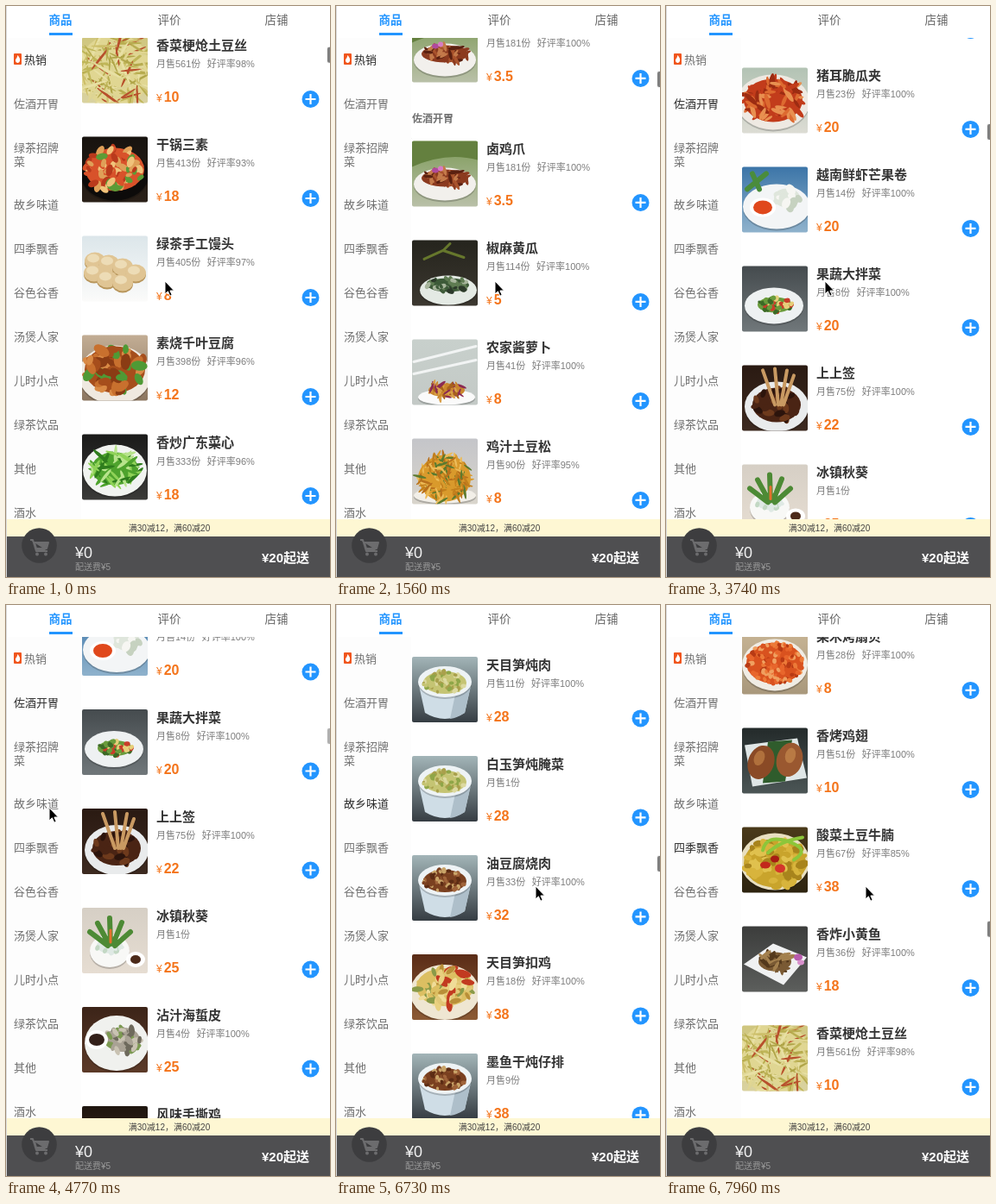
An HTML page that plays this animation: 375 by 662 pixels, repeating every 8 s.

```html
<!DOCTYPE html>
<html lang="zh-CN">
<head>
<meta charset="utf-8">
<style>
html, body { margin: 0; width: 100%; height: 100%; overflow: hidden; background: #fff; }
body { position: relative; font-family: "Liberation Sans", "Noto Sans CJK SC", "Noto Sans CJK", sans-serif; }
body div, body svg { position: absolute; white-space: nowrap; }
#view { left: 0; top: 37px; width: 375px; height: 558px; overflow: hidden; }
#list { left: 88px; top: 0; width: 287px; }
#list > div { left: 0; width: 287px; }
.item svg { left: 0; top: 0; border-radius: 2px; }
.name { left: 86px; top: -.5px; font: bold 15px/20px "Liberation Sans", "Noto Sans CJK SC", sans-serif; color: #333; }
.sold { left: 86px; top: 21px; font-size: 11px; line-height: 20px; color: #7c7c7c; }
.sold span { margin-left: 7.5px; }
.price { left: 86px; top: 60px; font-size: 12px; line-height: 20px; color: #f4741a; }
.price b { font-size: 16px; margin-left: 2px; }
.item .add { left: 254px; top: 61px; border-radius: 0; }
.head { font-size: 12px; line-height: 27px; font-weight: bold; color: #707070; }
#menu { left: 0; top: 0; width: 87px; height: 558px; background: #fdfdfd; }
#menu div { left: 9px; width: 53px; font-size: 13px; line-height: 16px; color: #707070; white-space: normal; }
#menu .on { color: #2c2c2c; }
#edge { left: 0; top: 0; width: 1px; height: 662px; background: #d8d8d8; }
#thumb { left: 371px; width: 5px; height: 18px; border: 1px solid rgba(255,255,255,.9); border-radius: 3px; background: #7f7f7f; }
.tab { top: 7px; width: 60px; text-align: center; font-size: 13.5px; line-height: 20px; color: #666; }
#tip { left: 0; top: 595px; width: 375px; height: 20px; background: #fef7d3; }
#tip div { left: 0; width: 378px; text-align: center; font-size: 10px; line-height: 21px; color: #444; }
#bar { left: 0; top: 615px; width: 375px; height: 47px; background: #4f4f51; }
</style>
</head>
<body>
<div id="view">
  <div id="list"></div>
  <div id="menu"></div>
  <div id="thumb"></div>
</div>
<div class="tab" style="left:33px;color:#2395ff;font-weight:bold">商品</div>
<div class="tab" style="left:159px">评价</div>
<div class="tab" style="left:283px">店铺</div>
<div style="left:50px;top:31px;width:27px;height:3px;background:#2395ff"></div>
<div id="tip"><div>满30减12，满60减20</div></div>
<div id="bar">
  <svg style="left:18px;top:-10px" width="41" height="41">
    <circle cx="20.5" cy="20.5" r="20.3" fill="#3d3d3f"/>
    <path d="M10 14h3l4 13h13M15 17h16l-2 7H17z" fill="#6c6c6e" stroke="#6c6c6e" stroke-width="2" stroke-linejoin="round"/>
    <circle cx="18" cy="30.500" r="2" fill="#6c6c6e"/><circle cx="28" cy="30.500" r="2" fill="#6c6c6e"/>
  </svg>
  <div style="left:80px;top:8px;font-size:18px;line-height:22px;color:#f2f2f2">¥0</div>
  <div style="left:80px;top:27px;font-size:10px;line-height:18px;color:#999">配送费¥5</div>
  <div style="left:296px;top:14px;font-size:15px;line-height:22px;font-weight:bold;color:#fff">¥20起送</div>
</div>
<div id="edge"></div>
<svg id="mouse" width="14" height="21" style="left:0;top:0">
  <path d="M1 1V16L4.4 12.8 6.8 18.2 9.2 17.2 6.9 12H11.5Z" fill="#000" stroke="#fff"/>
</svg>
<script>
const $ = id => document.getElementById(id);
const LOOP = 8000, STEP = 115, HEAD = 29;

const menu = ['热销', '佐酒开胃', '绿茶招牌菜', '故乡味道', '四季飘香', '谷色谷香', '汤煲人家', '儿时小点', '绿茶饮品', '其他', '酒水'];
const starts = [0, 10, 37, 62, 75];   // first dish of each category
const catTop = c => starts[c] * STEP + c * HEAD;

// top and bottom colour ; plate: cx cy rx ry colour ; food: cx cy rx ry count length width colours
const pot = '#a3b5b8 #363d43;38 29 31 18 #eef3f5;38 30 25 13 50 4 3 ';
const looks = {
  shreds: '#cfc67f #d9d2a0;;38 38 42 42 160 18 1.6 #e0d692 #bfb658 #dcd494 #b0a548 #e8e0a4 #cdbf6a #b8ad50 #e0d898 #b8502c',
  wok: '#17130f #2a2018;38 44 39 30 #0d0b0a;38 38 34 25 75 7 4 #d8522a #5c9c36 #dfa058 #f0c27a #b93a1c',
  buns: '#dce6ea #fbfbfa;;',
  tofu: '#c2ad94 #8c7660;38 46 42 34 #efe9e0;38 40 35 27 55 10 6 #a64e1c #c8702e #8a3c14 #d98a45 #4f9a35',
  greens: '#1b1b1a #3a3a38;38 42 37 30 #f1f3f0;38 40 27 19 55 13 2.4 #4ea32d #8fd257 #2f7d1d #b8e38c',
  feet: '#7d9a58 #b9c0a8;38 50 36 19 #f2f0ec;38 43 27 10 44 8 2.5 #8b3a1f #a9532c #5a2010 #c47a4a',
  cucumber: '#25241d #3c3830;42 58 33 17 #e4eae4;42 52 24 8 36 5 3 #3d5a38 #5f7c52 #2c3a2a #a7b59c',
  radish: '#c8d0cc #c3c9c6;40 67 33 9 #fafafa;40 59 21 8 38 9 2 #c9872e #d9a04a #a8621c #8b2a54',
  pile: '#c4c5c9 #d9d5cc;38 66 36 9 #f2efe8;38 46 30 27 120 9 1.6 #d99a2c #c27f1c #ecbb58 #5c7a2e #b8701c',
  fungus: '#416a9a #c5d3df;38 42 37 30 #eef1f0;38 36 27 17 55 6 4 #23261f #373a2e #15170f #739a3a',
  sesame: '#aebfa0 #cfd0cc;40 60 37 14 #fafafa;40 50 16 9 45 6 2.5 #8c6a42 #a98552 #6b8a3e #6a4a2c',
  cream: '#33414c #55636c;;38 51 20 7 22 6 3 #7a4020 #a0612e',
  mortar: '#39423f #1f2524;;40 26 17 7 26 5 3 #7a4526 #a86c3c #46210f',
  salad: '#1b2226 #3a4448;38 44 34 24 #edf1ea;36 36 19 13 45 6 3 #7fae50 #b7d18c #e6e8c4 #c23426',
  ears: '#b3c3b4 #dcdcd4;36 40 42 32 #eee9e2;36 38 34 25 70 10 3 #c23c1b #dd6a30 #9c2c12 #e89050',
  rolls: '#3c75a8 #8fb2cc;40 46 39 26 #f3f5f6;52 36 15 11 14 7 5 #dfe6dc #f6f6f2 #c6d2c0',
  boat: '#454b4e #70777a;37 46 34 21 #eef1f2;38 45 20 9 45 4 3 #6a9c3c #c93e2a #e6cf7a #3c6a26',
  sticks: '#2a1a12 #3d2a20;40 48 37 29 #e9ebec;40 46 28 20 30 7 4 #4a2414 #6e3a1c #2c140c',
  okra: '#d6cfc5 #e6ddd2;32 50 23 19 #f8f8f6;32 44 15 9 24 4 3 #dfe9e4 #c3d8c4',
  jelly: '#3c2418 #5c3a28;40 42 37 32 #f0f1ee;48 38 19 14 38 8 4 #a9a294 #c9c2b2 #6e6a5c #7c9a52',
  chicken: '#1f1610 #3a281c;38 50 36 24 #4a3020;38 44 26 16 45 8 3 #c98a4a #e0b47a #8c4f24 #5c8c36',
  potA: pot + '#c5c473 #8fa648 #dcd9a0 #a9a04c',
  potB: pot + '#7a4020 #5c2c14 #a0643a #c9a468',
  braise: '#5a2c17 #8c5a34;38 44 40 32 #efe6d2;38 38 33 22 60 9 4 #dcbf62 #f0dc98 #b98f38 #e2c878 #e9d080 #8a9a48 #c23a20',
  scallop: '#c8b595 #a9987c;38 42 38 30 #f0ece4;38 40 33 24 110 4 3 #d9521f #ec7a38 #b83a14 #f0a060 #e8662c',
  wings: '#232a2a #4c5656;;',
  sour: '#4a3a1a #2e2410;38 40 40 33 #e8dfc0;38 42 36 28 75 8 5 #c9a42c #e0c14e #a8841c #d8b43c',
  fish: '#3c3d3c #5c5e5c;;38 41 19 11 32 10 3 #7a5a34 #a3804e #54391c'
};

const dot = (x, y, rx, ry, fill, turn = 0) =>
  `<ellipse cx="${x}" cy="${y}" rx="${rx}" ry="${ry}" fill="${fill}" transform="rotate(${turn} ${x} ${y})"/>`;
const line = (d, color, w) => `<path d="${d}" stroke="${color}" stroke-width="${w}" fill="none" stroke-linecap="round"/>`;
const fill = (d, color) => `<path d="${d}" fill="${color}"/>`;
const bun = (x, y) => dot(x, y + 2, 12, 10, '#b8965c') + dot(x, y, 12, 10, '#e0c594') + dot(x - 2, y - 3, 7, 5, '#eddcb6');

// shapes below the food
const body = fill('M7 29L15 65Q38 79 61 65L69 29Z', '#cfdde6') + fill('M50 44L69 29 61 65Q52 71 44 72Z', '#aebfca');
const unders = {
  potA: body, potB: body,
  feet: fill('M0 0H76V22Q40 12 0 30Z', '#64803f'),
  cream: fill('M4 38L40 20 74 42 34 68Z', '#f1f3f5'),
  wings: fill('M3 20L64 12 75 58 12 68Z', '#dfe6e6'),
  fish: fill('M2 44L36 20 75 36 48 68Z', '#f0f1f2')
};
// shapes above the food
const extras = {
  buns: bun(15, 29) + bun(31, 32) + bun(47, 36) + bun(14, 43) + bun(62, 43) + bun(29, 50) + bun(47, 54),
  feet: dot(27, 34, 4, 3, '#b04a9c') + dot(33, 32, 3, 3, '#d67cc4'),
  cucumber: line('M14 22L36 12 60 20M36 12L44 4', '#66772c', 3),
  radish: line('M2 26L74 8M2 40L74 24', '#f2f4f4', 3),
  cream: fill('M20 32L46 27 58 35 56 49 31 53 20 45Z', '#f8f4e6') + line('M21 40L32 46 57 41', '#7a5a3c', 4),
  mortar: fill('M17 27Q40 42 64 27L58 66Q40 76 24 66Z', '#55301f') + line('M42 27L24 9', '#b5763c', 7),
  rolls: dot(24, 47, 15, 11, '#fff') + dot(24, 47, 11, 8, '#e0481c') + line('M6 26L28 8M12 8L20 26', '#4a8c3c', 6),
  sticks: line('M38 46L24 6M42 46L38 4M45 46L52 6M48 46L60 12', '#c99a62', 4),
  okra: line('M30 44L9 28M31 42L18 18M33 42L32 12M36 42L46 17M38 44L56 28', '#4d8a35', 6) + line('M33 40V26', '#e2702c', 3) + dot(62, 60, 11, 9, '#fff') + dot(62, 60, 6, 5, '#4c2a1a'),
  jelly: dot(17, 38, 13, 11, '#fff') + dot(17, 38, 9, 7, '#33201a'),
  wings: fill('M30 16L58 14 50 62 24 64Z', '#2f5c2c') + dot(22, 40, 15, 20, '#8a4a26', 20) + dot(55, 37, 15, 20, '#9a5830', 15) + dot(20, 35, 6, 9, '#b0703c', 20) + dot(56, 32, 6, 9, '#b97a44', 15),
  sour: line('M24 27Q28 8 54 17T60 38M30 30Q44 16 70 12', '#8cc63a', 4) + dot(27, 44, 6, 4, '#c2281c') + dot(44, 48, 6, 5, '#d4362a') + dot(38, 37, 5, 4, '#a81c14'),
  fish: dot(65, 36, 5, 4, '#b85cae') + dot(68, 42, 4, 3, '#d890cc')
};

function photo(key) {
  const [bg, plate, food] = looks[key].split(';').map(s => s.split(' '));
  let seed = key.length * 7919 + key.charCodeAt(0) * 131 + 7;
  const rnd = () => (seed = seed * 16807 % 2147483647) / 2147483647;
  let out = unders[key] || '';
  if (plate.length > 1) {
    const [x, y, rx, ry, color] = plate;
    out += dot(x, +y + 2, rx, ry, '#0003') + dot(x, y, rx, ry, color);
  }
  if (food.length > 1) {
    const [x, y, rx, ry, count, len, wid] = food.map(Number), colors = food.slice(7);
    out += dot(x, y, rx, ry, colors[0]);
    for (let i = 0; i < count; i++) {
      const a = rnd() * 6.283, r = Math.sqrt(rnd()), k = .5 + rnd() * .5;
      out += dot((x + rx * r * Math.cos(a)).toFixed(1), (y + ry * r * Math.sin(a)).toFixed(1),
        len * k, wid * k, colors[i % colors.length], Math.round(rnd() * 180));
    }
  }
  return `<svg width="76" height="76" style="background:linear-gradient(${bg})">${out}${extras[key] || ''}</svg>`;
}

// name, monthly sales, rating, price, look
const runs = {
  2: ['香菜梗炝土豆丝 561 98 10 shreds', '干锅三素 413 93 18 wok', '绿茶手工馒头 405 97 8 buns', '素烧千叶豆腐 398 96 12 tofu', '香炒广东菜心 333 96 18 greens'],
  9: ['卤鸡爪 181 100 3.5 feet', '卤鸡爪 181 100 3.5 feet', '椒麻黄瓜 114 100 5 cucumber', '农家酱萝卜 41 100 8 radish', '鸡汁土豆松 90 95 8 pile',
    '手擂茄子 68 100 9 mortar', '爽口木耳 94 95 9 fungus', '麻酱油麦菜 49 90 10 sesame', '皮蛋豆腐 39 100 10 cream', '手擂茄子 68 100 12 mortar', '菜梗香 6 100 12 salad'],
  25: ['猪耳脆瓜夹 23 100 20 ears', '越南鲜虾芒果卷 14 100 20 rolls', '果蔬大拌菜 8 100 20 boat', '上上签 75 100 22 sticks', '冰镇秋葵 1 0 25 okra', '沾汁海蜇皮 4 100 25 jelly', '风味手撕鸡 5 100 26 chicken'],
  64: ['天目笋炖肉 11 100 28 potA', '白玉笋炖腌菜 1 0 28 potA', '油豆腐烧肉 33 100 32 potB', '天目笋扣鸡 18 100 38 braise', '墨鱼干炖仔排 9 0 38 potB'],
  83: ['果木烤扇贝 28 100 8 scallop', '香烤鸡翅 51 100 10 wings', '酸菜土豆牛腩 67 85 38 sour', '香炸小黄鱼 36 100 18 fish', '香菜梗炝土豆丝 561 98 10 shreds']
};
const dishes = [];
for (const first in runs) runs[first].forEach((d, k) => dishes[+first + k] = d);
const known = Object.values(runs).flat();
const photos = {};
for (const key in looks) photos[key] = photo(key);

const add = (parent, cls, html, top) => {
  const el = document.createElement('div');
  el.className = cls;
  el.innerHTML = html;
  el.style.top = top + 'px';
  parent.append(el);
  return el;
};
const plus = '<svg class="add" width="21" height="21"><circle cx="10.5" cy="10.5" r="10" fill="#2395ff"/><path d="M4.5 10.5h12M10.5 4.5v12" stroke="#fff" stroke-width="2.2"/></svg>';

const rows = [];
starts.forEach((s, c) => add($('list'), 'head', menu[c], catTop(c)));
for (let i = 0; i < 90; i++) {
  const c = starts.filter(s => s <= i).length - 1, y = 38 + i * STEP + c * HEAD;
  const [name, sold, rate, price, key] = (dishes[i] || known[i * 7 % known.length]).split(' ');
  const good = +rate ? `<span>好评率${rate}%</span>` : '';
  const el = add($('list'), 'item', `${photos[key]}<div class="name">${name}</div><div class="sold">月售${sold}份${good}</div><div class="price">¥<b>${price}</b></div>${plus}`, y);
  rows.push({ el, y });
}

const flame = '<svg width="9" height="13" style="left:0;top:0"><rect width="9" height="13" rx="1" fill="#f0561d"/><path d="M4.5 2Q8 6 7 9Q6 11 4.5 11T2 9Q1.5 7 3.5 5Z" fill="#fff"/></svg>';
let menuY = 17.5;
const tabs = menu.map((name, i) => {
  const el = add($('menu'), '', i ? name : flame + '<span style="margin-left:12px">热销</span>', menuY);
  menuY += name.length > 4 ? 66 : 51;
  return el;
});

// time, value, speed
const dragDown = [[0, 268, .5], [1560, 1097, .53], [2760, 1737, .8], [3740, 2907, .6], [4450, 3088, 0]];
const dragOn = [[6350, 7217, 0], [6730, 7461, 1.1], [7960, 9707, 1.6], [8000, 9771, 1.6]];
const mouseX = [[4560, 184, 0], [4770, 50, 0], [5060, 37, 0], [5720, 37, 0], [6220, 231, 0]];
const mouseY = [[4560, 319, 0], [4770, 235, 0], [5060, 240, 0], [5720, 240, 0], [6220, 326, 0]];
const thumbFade = [[4560, 1, 0], [5060, 0, 0], [5240, 0, 0], [5290, 1, 0], [5720, 1, 0], [6220, 0, 0], [6340, 0, 0], [6400, 1, 0]];

function glide(list, t) {
  const i = list.findIndex(k => t < k[0]);
  if (i < 0) return list[list.length - 1][1];
  if (!i) return list[0][1];
  const [t0, s0, v0] = list[i - 1], [t1, s1, v1] = list[i], d = t1 - t0, u = (t - t0) / d;
  return s0 + (s1 - s0) * u * u * (3 - 2 * u) + d * u * (1 - u) * (v0 * (1 - u) - v1 * u);
}

function scrollAt(t) {
  if (t < 5250) return glide(dragDown, t);
  if (t < 5550) return 7217 - (7217 - 3088) * (1 - (t - 5250) / 300) ** 4;
  return glide(dragOn, t);
}

function draw(t) {
  const s = scrollAt(t);
  $('list').style.transform = `translateY(${-s}px)`;
  for (const r of rows) r.el.style.display = r.y > s - 100 && r.y < s + 570 ? '' : 'none';
  const active = starts.filter((_, c) => catTop(c) <= s + .5).length - 1;
  tabs.forEach((el, i) => el.className = i == active ? 'on' : '');
  $('thumb').style.transform = `translateY(${s / 29.6 + .8}px)`;
  $('thumb').style.opacity = glide(thumbFade, t);
  $('mouse').style.transform = `translate(${glide(mouseX, t) - 1}px,${glide(mouseY, t) - 1}px)`;
}

const begin = performance.now();
function tick() {
  draw((performance.now() - begin) % LOOP);
  requestAnimationFrame(tick);
}
tick();
</script>
</body>
</html>
```
